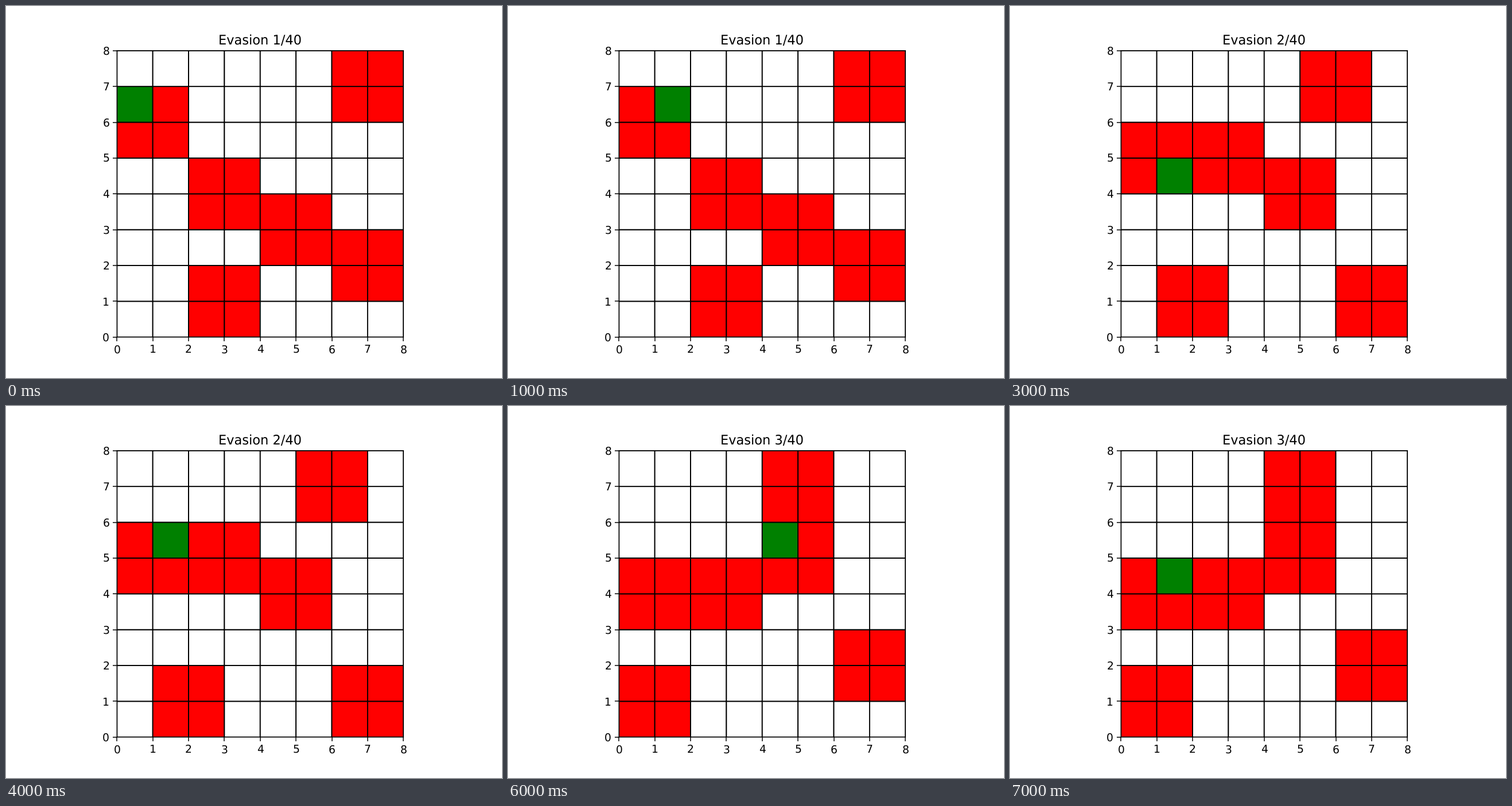
Animation of 864 by 648 pixels, one loop 8 s. Source, as a matplotlib script:

```python
from itertools import product

import matplotlib.pyplot as plt
from matplotlib.animation import FuncAnimation
from matplotlib.patches import Rectangle

SIZE = 8
ROUNDS = 40
LEFT, UP, DOWN = (-1, 0), (0, 1), (0, -1)

# Each 2x2 block patrols back and forth: start corner, direction, reach
PATROLS = [
    ((0, 5), DOWN, 2), ((2, 3), UP, 1), ((4, 2), UP, 2),
    ((6, 1), DOWN, 1), ((2, 0), LEFT, 2), ((6, 6), LEFT, 2),
]

# Green cells visited in each round
VISITS = [[(0, 6), (1, 6), (1, 5)], [(1, 4), (1, 5)], [(4, 6), (4, 5), (1, 4)]]
STEPS = [(rnd, cell) for rnd, visits in enumerate(VISITS) for cell in visits]


def block_corner(patrol, rnd):
    (x, y), (dx, dy), reach = patrol
    moved = reach - abs(rnd % (2 * reach) - reach)
    return x + dx * moved, y + dy * moved


def red_cells(rnd):
    corners = [block_corner(patrol, rnd) for patrol in PATROLS]
    return {(x + i, y + j) for x, y in corners
            for i, j in product(range(2), repeat=2)}


plt.rcParams.update({
    "font.family": "DejaVu Sans",
    "text.hinting": "none",
    "path.snap": False,
})
fig, ax = plt.subplots(figsize=(6.4, 4.8), dpi=135)
ax.set(xlim=(0, SIZE), ylim=(0, SIZE), aspect="equal",
       xticks=range(SIZE + 1), yticks=range(SIZE + 1))
title = ax.set_title("")

cells = {}
for pos in product(range(SIZE), repeat=2):
    cells[pos] = ax.add_patch(
        Rectangle(pos, 1, 1, facecolor="white", edgecolor="black", linewidth=1))


def draw(step):
    rnd, green = STEPS[step]
    red = red_cells(rnd)
    for pos, cell in cells.items():
        cell.set_facecolor("red" if pos in red else "white")
    cells[green].set_facecolor("green")
    title.set_text(f"Evasion {rnd + 1}/{ROUNDS}")
    return [title, *cells.values()]


anim = FuncAnimation(fig, draw, frames=len(STEPS), interval=1000,
                     repeat=True, repeat_delay=0, blit=False)
plt.show()
```
